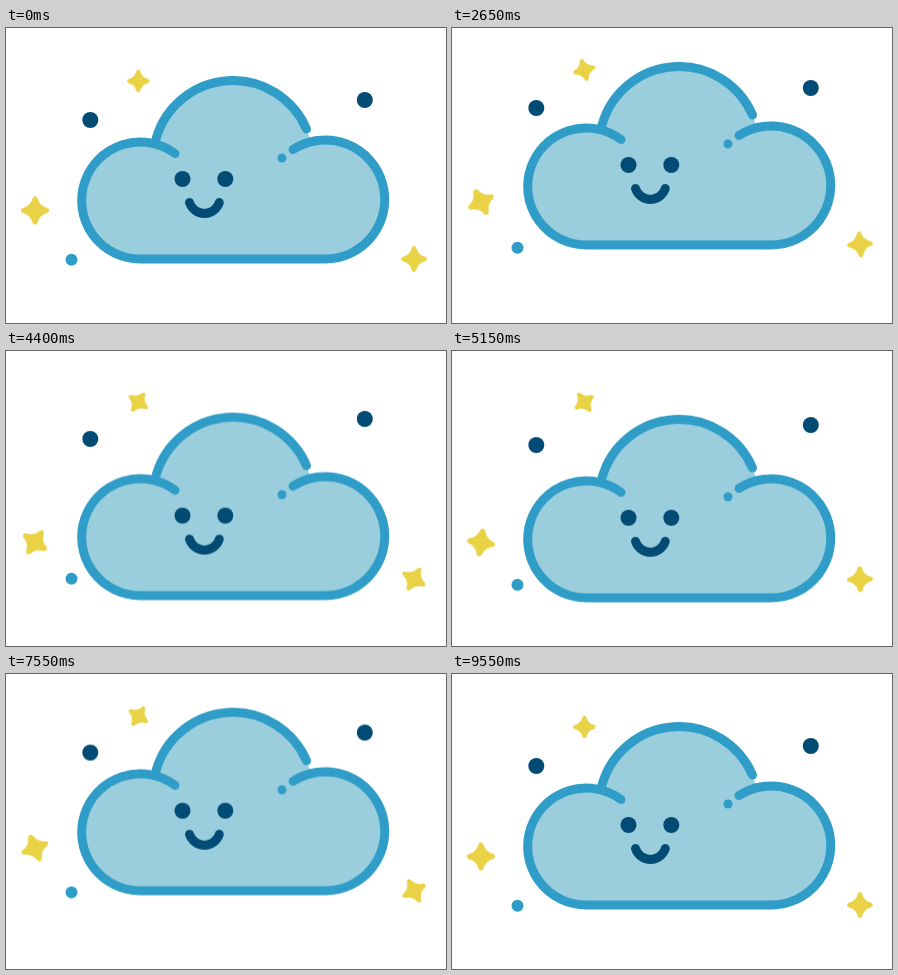
These frames come from a looping animation (440 px wide and 295 px high, 9.6 s). An HTML page without scripts:

```html
<!DOCTYPE html>
<html lang="en">
<head>
<meta charset="utf-8">
<title>Happy cloud</title>
<style>
  html, body { margin: 0; width: 100%; height: 100%; overflow: hidden; background: #fff; }
  svg { display: block; width: 100vw; height: 100vh; }

  :root { --sky: #9acedd; --blue: #2f9dc7; --navy: #024b74; --gold: #ead246; }
  .line { fill: none; stroke: var(--blue); stroke-width: 9; stroke-linecap: round; }
  .navy { fill: var(--navy); }
  .blue { fill: var(--blue); }
  .sky { fill: var(--sky); }
  .star { fill: var(--gold); stroke: var(--gold); stroke-width: 5; stroke-linejoin: round; }

  .cloud, .bob, .dots { animation: bob 9.6s cubic-bezier(.37, 0, .63, 1) infinite; }
  .cloud { --low: 16.6px; --high: -14.6px; animation-name: drift; }
  .dots { animation-name: hover; }
  .spin { animation: 9.6s linear infinite; }
  .left .spin { animation-name: spin-left; }
  .top .spin { animation-name: spin-top; }
  .right .spin { animation-name: spin-right; }
  .left .bob { --high: -9px; --low: 10px; }
  .top .bob { --high: -11.3px; --low: -1.2px; }
  .right .bob { --high: -15px; --low: -2px; }

  @keyframes drift {
    0%, 99.5%, 100% { transform: translateY(0); }
    25.5%, 76.5% { transform: translateY(var(--high)); }
    51% { transform: translateY(var(--low)); }
  }
  @keyframes bob {
    0%, 99.5%, 100% { transform: translateY(0); }
    25%, 75% { transform: translateY(var(--high)); }
    50% { transform: translateY(var(--low)); }
  }
  @keyframes hover {
    0%, 99.5%, 100% { transform: translateY(0); }
    37.5% { transform: translateY(-14.3px); }
    52% { transform: translateY(2.2px); }
    76.5% { transform: translateY(-13.7px); }
  }
  @keyframes spin-left {
    15.1% { transform: rotate(140deg); }
    38.5% { transform: rotate(333deg); }
    53.6% { transform: rotate(458deg); }
    64.1% { transform: rotate(510deg); }
    78.6% { transform: rotate(608deg); }
    99.5%, 100% { transform: rotate(720deg); }
  }
  @keyframes spin-top {
    99.5%, 100% { transform: rotate(270deg); }
  }
  @keyframes spin-right {
    15.1% { transform: rotate(95deg); }
    38.5% { transform: rotate(245deg); }
    53.6% { transform: rotate(358deg); }
    64.1% { transform: rotate(405deg); }
    78.6% { transform: rotate(512deg); }
    99.5%, 100% { transform: rotate(630deg); }
  }
</style>
</head>
<body>
<svg viewBox="0 0 440 295">
  <defs>
    <path id="star" class="star" d="M0-11.5Q2.5-2.5 11.5 0Q2.5 2.5 0 11.5Q-2.5 2.5-11.5 0Q-2.5-2.5 0-11.5Z"/>
  </defs>

  <g class="cloud">
    <g class="sky">
      <circle cx="227" cy="133" r="80"/>
      <circle cx="134" cy="172.5" r="58.5"/>
      <circle cx="319" cy="171.5" r="59.5"/>
      <path d="M134 150H319V231H134Z"/>
    </g>
    <path class="line" d="M150 111A80 80 0 0 1 300.5 101"/>
    <path class="line" d="M169 125.5A58.5 58.5 0 1 0 134 231H319A59.5 59.5 0 1 0 287 121.5"/>
    <circle class="blue" cx="276" cy="130" r="4.5"/>
    <g class="navy">
      <circle cx="176.5" cy="151" r="8"/>
      <circle cx="219.3" cy="151" r="8"/>
    </g>
    <path class="line" style="stroke: var(--navy)" d="M183.5 174.5A15.6 15.6 0 0 0 213.3 174.5"/>
  </g>

  <g class="dots">
    <circle class="navy" cx="84.3" cy="92" r="8"/>
    <circle class="navy" cx="358.8" cy="72" r="8"/>
    <circle class="blue" cx="65.5" cy="231.8" r="6"/>
  </g>

  <g class="left" transform="translate(29 182.5)">
    <g class="bob"><g class="spin"><use href="#star"/></g></g>
  </g>
  <g class="top" transform="translate(132.3 53)">
    <g class="bob"><g class="spin"><use href="#star" transform="scale(.8)"/></g></g>
  </g>
  <g class="right" transform="translate(408 231)">
    <g class="bob"><g class="spin"><use href="#star" transform="scale(.92)"/></g></g>
  </g>
</svg>
</body>
</html>
```
